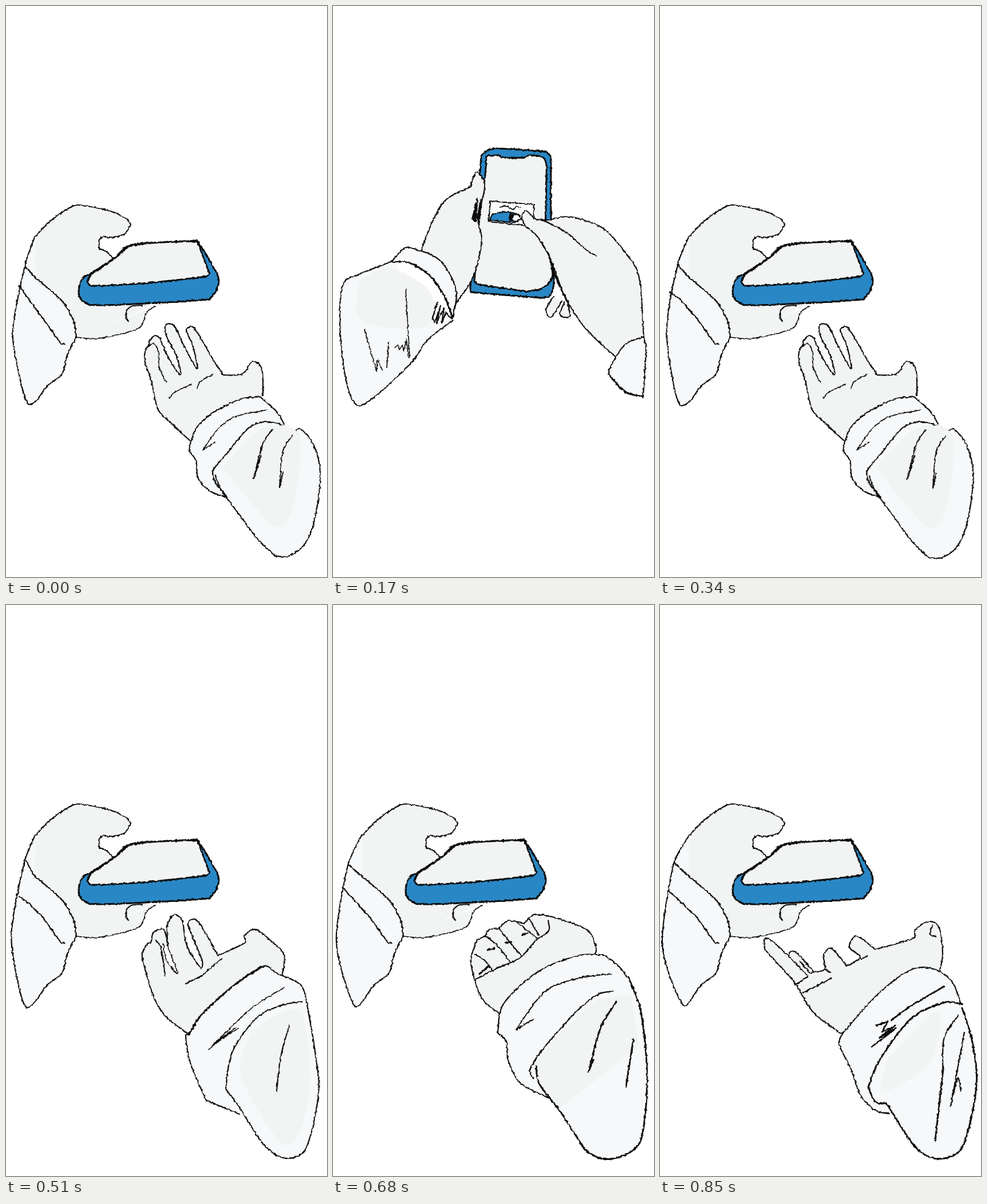
An HTML page for the animation above (1020 ms loop, 561x998 px).

```html
<!DOCTYPE html>
<html lang="en">
<head>
<meta charset="utf-8">
<title>Passing the phone</title>
<style>
  html, body { margin: 0; width: 100%; height: 100%; overflow: hidden; background: #fff; }
  svg { display: block; width: 100%; height: 100%; }
  path { fill: none; stroke: #0c0c0c; stroke-width: 2.2; stroke-linecap: round; stroke-linejoin: round; }
  .skin { fill: #f2f4f4; }
  .cloth { fill: #f6f8fa; }
  .blue { fill: #2a87c5; }
  .white { fill: #fff; }
  .ink { fill: #0c0c0c; }
  .core { fill: #f2f4f4; stroke: #f2f4f4; }
  .shade { stroke: none; fill: #f2f4f3; }
  .thin { stroke-width: 1.7; }
  .bold { stroke-width: 3; }
  .longer { transform: scale(.99, 1.012); transform-origin: 362px 730px; }
  .pose { animation: pose 1020ms step-end infinite; animation-delay: calc((var(--i) - 6) * 170ms); }
  .giver { animation: giver 1020ms step-end infinite; }
  @keyframes pose { 0% { visibility: visible; } 16.6666%, 100% { visibility: hidden; } }
  @keyframes giver { 0% { visibility: visible; } 16.6666% { visibility: hidden; } 33.3333%, 100% { visibility: visible; } }
</style>
</head>
<body>
<svg viewBox="0 0 561 998">
  <defs>
    <filter id="rough" filterUnits="userSpaceOnUse" x="0" y="0" width="561" height="998" color-interpolation-filters="sRGB">
      <feTurbulence type="fractalNoise" baseFrequency=".2" numOctaves="2" seed="4"/>
      <feDisplacementMap in="SourceGraphic" scale="4" xChannelSelector="R" yChannelSelector="G"/>
    </filter>

    <g id="palm">
      <path class="skin" data-p="323 761 284 725 265 704 254 655 243 622 244 600 252 592/250 586 260 576 269 580/284 615 305 645 298 612 280 576 279 557 294 559 310 592 334 634 326 592 315 567 328 562 362 618 380 645/414 643 430 621 447 634 449 682"/>
      <path class="thin" data-p="250 592 260 591 266 604 268 632 280 658|285 685 295 675 324 661|334 668 340 656 362 644"/>
      <path class="cloth" data-p="486 731 474 710 444 683/410 687 360 712 334 736 323 762 320 778/332 795 336 826 357 848 383 858"/>
      <path class="thin" data-p="456 706 400 718 370 740 344 776/365 763"/>
    </g>
    <g id="sleeve">
      <path class="cloth" data-p="366 834 362 812 388 780 426 736 464 727 505 742/515 739 538 768 549 815 542 885 524 938 495 961 470 961/440 932 404 884 366 834"/>
      <path class="shade" data-p="378 805 450 738 512 750 500 880 470 910 378 805"/>
      <path data-p="465 741 449 764 433 826/446 785|500 751 484 778 478 842/484 815|366 820 371 836 386 858"/>
    </g>
  </defs>

  <g filter="url(#rough)">
    <!-- giving hand, with the outer sleeve edge per pose -->
    <path class="core giver" data-p="52 406/188 443/246 527/123 579/57 686/48 472/52 406"/>
    <path class="pose cloth" style="--i:0" data-p="50 404 33 454 12 565 21 635 38 695 56 687"/>
    <path class="pose cloth" style="--i:2" data-p="50 404 31 452 12 560 21 647 35 697 56 687"/>
    <path class="pose cloth" style="--i:3" data-p="50 404 32 450 10 565 15 630 34 702 56 687"/>
    <path class="pose cloth" style="--i:4" data-p="50 402 26 455 6 575 14 635 38 701 56 687"/>
    <path class="pose cloth" style="--i:5" data-p="50 404 24 452 4 580 14 640 41 700 56 687"/>

    <g class="giver">
      <path class="skin" data-p="50 404 82 372 116 350 130 348 182 358 210 372 217 381 206 399 180 405 171 402/163 408 163 424/177 430 188 443"/>
      <path class="cloth" data-p="48 472 98 516 118 550 123 579/107 610 98 643 72 664 56 687"/>
      <path class="skin thin" data-p="123 579 162 581 232 563 246 535 260 525"/>
      <path data-p="238 523 217 526 209 541 214 551|62 543 96 590/103 591"/>
      <path class="blue bold" data-p="146 469 190 440 214 419 255 414 334 410/348 432 371 474 368 497 355 513/262 519 155 523 133 515 127 496 134 476 146 469"/>
      <path class="skin bold" data-p="147 470 190 441 216 419/255 414 334 411/343 434 355 468 350 473/250 484 165 489 148 489/143 483 147 470"/>
    </g>

    <path class="pose" style="--i:0" data-p="33 454 48 472|23 489 38 510 62 543"/>
    <path class="pose" style="--i:2" data-p="31 452 48 472|17 500 34 512 62 543"/>
    <path class="pose" style="--i:3" data-p="35 447 48 472|23 510 37 519 62 543"/>
    <path class="pose" style="--i:4" data-p="27 454 48 472|19 496 62 543"/>
    <path class="pose" style="--i:5" data-p="24 450 48 472|16 500 62 543"/>

    <!-- open receiving hand -->
    <g class="pose" style="--i:0"><use href="#palm"/><use href="#sleeve"/></g>
    <g class="pose" style="--i:2"><use href="#palm"/><use href="#sleeve" class="longer"/></g>

    <!-- fingers curling -->
    <g class="pose" style="--i:3">
      <path class="skin" data-p="320 750 285 725 260 690 238 615 243 598 254 588/258 572 276 568 283 598/282 560 294 541 308 552 316 595 340 634 343 622 326 580 318 556 332 550 350 576 370 613/418 590 417 578 436 567 464 588 486 612 482 650"/>
      <path class="white thin" data-p="275 592 280 620 300 644 283 598"/>
      <path data-p="262 586 271 600 278 648|314 662 342 648/376 619"/>
      <path class="cloth" data-p="526 698 515 664 474 644 450 631 398 665 342 716 320 750/314 752 322 800 350 866/384 880 408 890"/>
      <path class="bold" data-p="320 750 342 716 398 665 450 631"/>
      <path class="thin" data-p="487 668 430 704 354 777/402 738/364 766/406 740/364 767"/>
      <path class="cloth" data-p="518 693 484 699 440 720 396 780 384 846/404 872 452 945 490 967 524 950 546 855 540 780 526 698"/>
      <path class="shade" data-p="430 745 512 710 530 850 490 945 410 820 430 745"/>
      <path data-p="495 735 480 790 473 850"/>
    </g>

    <!-- fist -->
    <g class="pose" style="--i:4">
      <path class="skin" data-p="290 714 262 690 249 660 241 620 252 585/266 578 272 568 290 565/306 552 334 556/354 541 400 550 446 570 460 600 455 616"/>
      <path data-p="247 656 284 636 326 617 356 584/372 575 378 566 376 552|247 610 264 620 280 640|266 578 286 594 308 622|290 565 308 588 328 612|322 555 356 582|342 547 360 577"/>
      <path class="bold" data-p="270 603 282 600|302 590 312 589|330 577 340 573|256 645 272 631"/>
      <path class="cloth" data-p="520 660 500 632 474 612/432 612 360 640 298 697 288 748/303 763 306 795 328 836 378 862"/>
      <path data-p="487 645 430 652 370 676 320 742/350 724"/>
      <path class="cloth" data-p="350 828 344 812 380 760 460 682 524 677"/>
      <path class="cloth bold" data-p="516 650 538 710 549 830 538 935 508 962 470 968 440 952/396 884 360 836 355 806"/>
      <path class="core" data-p="357 800/390 756/462 690/520 682/534 770/396 878/358 826"/>
      <path class="bold" data-p="495 694 468 738 447 815/455 795|525 759 512 842"/>
    </g>

    <!-- reaching out -->
    <g class="pose" style="--i:5">
      <path class="skin" data-p="318 750 268 712 234 658 184 602 188 582 226 615/228 606 238 607 270 642/288 636 286 612 300 600 326 631/350 616 331 598 344 579 376 602/444 582 446 568 470 553 488 564 494 610 488 642"/>
      <path data-p="476 560 472 575 482 580|226 615 258 648|244 622 262 643 270 642|236 664 258 650|250 678 300 652|288 636 297 642|352 618 362 614"/>
      <path class="cloth" data-p="528 705 505 652 450 634 385 676 318 750/313 768 334 812 350 856 376 883 400 889"/>
      <path class="bold" data-p="496 667 440 700 404 726|378 735/398 728/388 746/411 735/384 756/412 740/370 772"/>
      <path class="cloth bold" data-p="528 698 500 694 440 722 384 795 364 842/376 868 396 871/445 946 485 968 528 948 553 840 545 760 528 705"/>
      <path class="shade" data-p="400 790 486 710 470 800 390 850 400 790"/>
      <path data-p="522 717 497 755 494 810|532 746 508 876/520 828 526 850"/>
      <path class="bold" data-p="495 810 481 936"/>
    </g>

    <!-- phone seen from the front -->
    <g class="pose" style="--i:1">
      <path class="skin" data-p="385 508 372 532 382 543 400 516|404 518 397 540 414 543 410 522"/>
      <path class="blue bold" data-p="259 262 268 253 286 249 372 255 381 264/381 370 386 480 378 507 350 509 241 500/240 490 254 400 257 290 259 262"/>
      <path class="skin bold" data-p="268 262 290 261 295 265/335 265 342 261 366 264 373 280 372 400 384 470 368 492 340 499/255 487 247 482/256 370 266 295 268 262"/>
      <path class="white" data-p="275 341/352 347/349 385/272 377/275 341"/>
      <path class="thin" data-p="291 352/302 349/308 352/314 356/320 351/328 352"/>
      <path class="blue" data-p="274 374 280 364 305 360 326 367 318 378 274 374"/>
      <path class="white" data-p="315 365/324 364/328 372/320 377/313 374/315 365"/>
      <path class="ink thin" data-p="308 362/314 364/312 375/308 375"/>

      <path class="skin" data-p="155 427 168 390 196 340 240 316/250 291 264 306 264 325 253 370 260 410 244 475 214 521"/>
      <path class="ink thin" data-p="252 336 243 372/250 376 252 336"/>
      <path class="blue thin" data-p="258 338 252 370/258 338"/>
      <path class="cloth" data-p="102 447 45 469 18 485 12 555 22 650 41 697 74 682 140 620 164 585 210 549"/>
      <path class="cloth" data-p="102 447 122 425 134 422 186 444 215 496 209 546/196 510 168 470 134 449 102 447"/>
      <path class="shade" data-p="46 480 100 460 170 500 160 560 50 550 46 480"/>
      <path class="bold" data-p="134 449 168 470 196 510 209 546"/>
      <path class="thin" data-p="55 566 76 638/78 618/86 636|97 587 94 632|127 494 134 613|108 598/114 592/116 602/121 593/124 603/128 583/132 614"/>
      <path data-p="182 518/174 545/178 553/188 524/181 554/194 528/190 555/197 536/207 546"/>

      <path class="skin" data-p="494 614 440 562 404 505 382 446 358 404 336 384 330 369 338 358 354 372 378 374/410 368 444 376 474 390 504 422 534 470 543 578"/>
      <path class="bold" data-p="380 446 392 480 414 525"/>
      <path data-p="366 374 408 396 440 424 460 437"/>
      <path class="cloth" data-p="543 578 510 592 484 632 482 644/510 674 542 683/547 600 543 578"/>
      <path class="bold" data-p="482 644 510 674 542 683"/>
    </g>
  </g>
</svg>
<script>
  // "x y x y" runs become smooth curves; "/" marks a corner, "|" lifts the pen
  const points = run => run.match(/\d+ \d+/g).map(pair => pair.split(' ').map(Number));

  const curve = pts => pts.slice(1).map((end, i) => {
    const start = pts[i], before = pts[i - 1] || start, after = pts[i + 2] || end;
    const span = Math.hypot(end[0] - start[0], end[1] - start[1]);
    // keep handles short beside a much longer neighbour
    const handle = (a, b) => {
      const dx = b[0] - a[0], dy = b[1] - a[1];
      const k = Math.min(1 / 6, span * .36 / (Math.hypot(dx, dy) || 1));
      return [dx * k, dy * k];
    };
    const out = handle(before, end), into = handle(start, after);
    return `C${[start[0] + out[0], start[1] + out[1], end[0] - into[0], end[1] - into[1], ...end]}`;
  }).join('');

  const stroke = line => {
    let last;
    return line.split('/').map(run => {
      const pts = points(run);
      const move = last ? '' : `M${pts[0]}`;
      if (last) pts.unshift(last);
      last = pts[pts.length - 1];
      return move + curve(pts);
    }).join('');
  };

  for (const path of document.querySelectorAll('[data-p]'))
    path.setAttribute('d', path.dataset.p.split('|').map(stroke).join(''));
</script>
</body>
</html>
```
